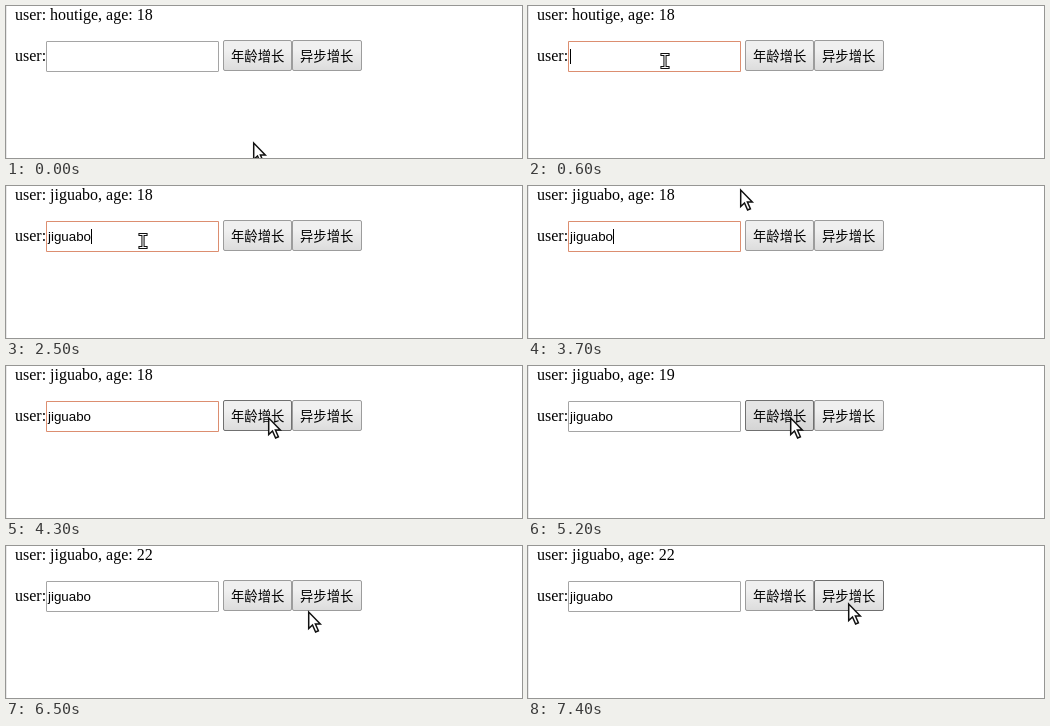
Animation, 516 px wide and 152 px high, one loop 8 s. Source, as an HTML page:

```html
<!DOCTYPE html>
<html lang="zh-CN">
<head>
<meta charset="utf-8">
<style>
html, body { margin: 0; width: 100%; height: 100%; overflow: hidden; background: #fff; }
svg { display: block; }
text { font: 16px "Liberation Serif", "Times New Roman", serif; white-space: pre; }
#typed { font: 13.333px "Liberation Sans", Arial, sans-serif; }
.button text { font: 13.333px "Noto Sans CJK SC", "Noto Sans CJK", sans-serif; }
.button rect { fill: url(#face); stroke: #9c9c9c; }
.button.hover rect { stroke: #707070; }
.button.down rect { fill: url(#faceDown); }
#field { fill: #fff; stroke: #a5a5a5; }
#field.focus { stroke: #dc8e70; filter: drop-shadow(0 0 .6px #dc8e70); }
</style>
</head>
<body>
<svg width="516" height="152" viewBox="0 0 516 152">
  <defs>
    <linearGradient id="face" x2="0" y2="1"><stop offset=".3" stop-color="#f0f0f0"/><stop offset="1" stop-color="#dcdcdc"/></linearGradient>
    <linearGradient id="faceDown" x2="0" y2="1"><stop offset=".3" stop-color="#e4e4e4"/><stop offset="1" stop-color="#d4d4d4"/></linearGradient>
  </defs>
  <rect width="1" height="152" fill="#e9e9e9"/>
  <text id="title" x="9" y="14"></text>
  <text x="9" y="55">user:</text>
  <rect id="field" x="40.5" y="35.5" width="172" height="30" rx=".5"/>
  <text id="typed" x="42" y="55"></text>
  <rect id="caret" y="43" width="1" height="15"/>
  <g class="button"><rect x="217.5" y="34.5" width="68" height="30" rx="1.5"/><text x="225" y="55">年龄增长</text></g>
  <g class="button"><rect x="286.5" y="34.5" width="69" height="30" rx="1.5"/><text x="294" y="55">异步增长</text></g>
  <path id="arrow" d="M.7 1V17.5L4.5 14L7.6 21L10.4 19.8L7.4 13H12.3Z" fill="#fff" stroke="#111" stroke-width="1.5"/>
  <g id="beam" fill="none" stroke-linecap="square">
    <path d="M-3 -6.5H3M-3 6.5H3M0 -6.5V6.5" stroke="#111" stroke-width="3.2"/>
    <path d="M-3 -6.5H3M-3 6.5H3M0 -6.5V6.5" stroke="#fff" stroke-width="1.1"/>
  </g>
</svg>
<script>
const $ = id => document.getElementById(id);
const buttons = document.querySelectorAll('.button');
const firstName = 'houtige', newName = 'jiguabo';
const focusAt = 600, blurAt = 4400;

// Press and release times for each button
const clicks = [
  [[4400, 4500], [5200, 5400], [5600, 5700], [5800, 5900]],
  [[7300, 7400]]
];

// Pointer moves; sway bends the way into an S
const moves = [
  { from: 0, to: 500, x: 137, y: 55 },
  { from: 3100, to: 3200, x: 137, y: 56 },
  { from: 3500, to: 4300, x: 262, y: 51, sway: 52 },
  { from: 6100, to: 6500, x: 302, y: 65 },
  { from: 6500, to: 6600, x: 317, y: 61 },
  { from: 6800, to: 6900, x: 320, y: 57 }
];

const show = (el, on) => el.setAttribute('visibility', on ? 'visible' : 'hidden');

function pointer(t) {
  let x = 247, y = 136;
  for (const { from, to, x: endX, y: endY, sway = 0 } of moves) {
    const k = Math.min(1, Math.max(0, (t - from) / (to - from)));
    x += (endX - x) * k + 1.2 * sway * Math.sin(Math.PI * k);
    y += (endY - y) * k - sway * Math.sin(2 * Math.PI * k);
  }
  return [Math.round(x), Math.round(y)];
}

function draw(t) {
  // Typing speeds up from one key per 200 ms to one per 100 ms
  const keys = Math.max(0, (t - 1400) / 200, (t - 1800) / 100);
  const typed = newName.slice(0, keys);
  const age = 18 + clicks[0].filter(([, release]) => t >= release).length;
  $('title').textContent = `user: ${typed || firstName}, age: ${age}`;
  $('typed').textContent = typed;

  const focused = t >= focusAt && t < blurAt;
  const typing = t >= 1600 && t < 2600;
  $('field').classList.toggle('focus', focused);
  $('caret').setAttribute('x', 42 + Math.round(typed ? $('typed').getComputedTextLength() : 0));
  show($('caret'), focused && (typing || (t - focusAt) % 1000 < 500));

  const [x, y] = pointer(t);
  const over = (left, right) => x >= left && x < right && y >= 34 && y < 65;
  const overField = over(40, 213);
  for (const [id, on] of [['arrow', !overField], ['beam', overField]]) {
    $(id).setAttribute('transform', `translate(${x} ${y})`);
    show($(id), on);
  }
  buttons.forEach((button, i) => {
    const left = 217 + 69 * i;
    button.classList.toggle('hover', over(left, left + 69));
    button.classList.toggle('down', clicks[i].some(([press, release]) => t >= press && t < release));
  });
}

const start = performance.now();
function tick() {
  const t = (performance.now() - start) % 8000;
  draw(Math.floor(t / 100) * 100);
  requestAnimationFrame(tick);
}
tick();
</script>
</body>
</html>
```
